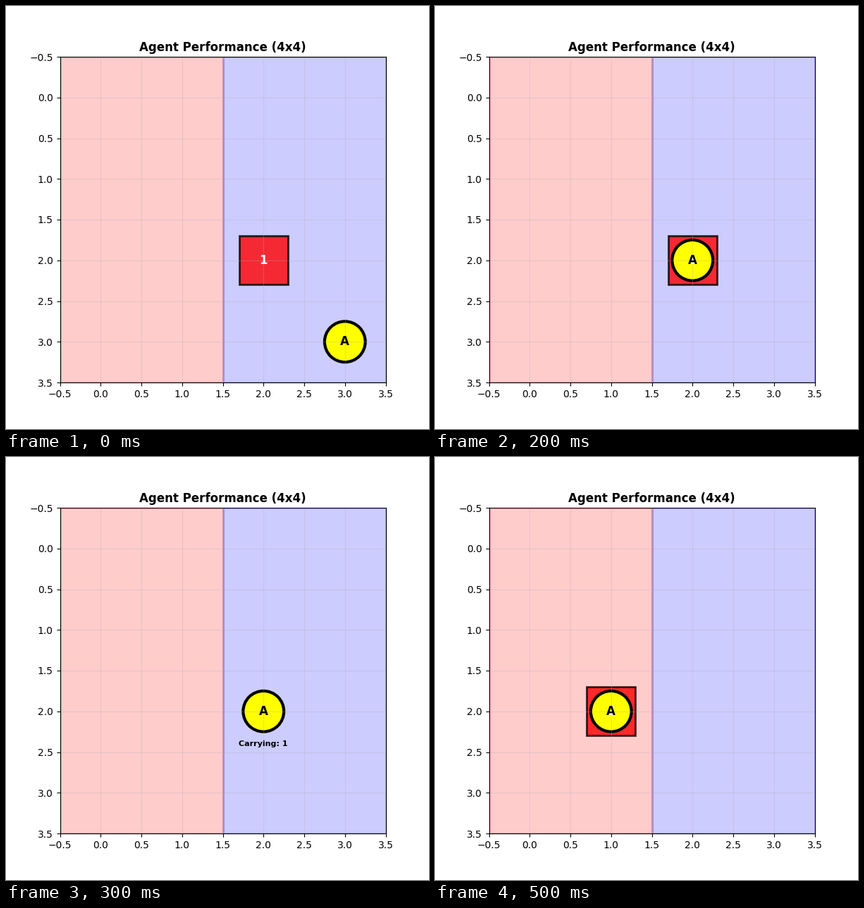
A matplotlib script for the animation above (0.6 s loop, 600 by 600 pixels).

```python
import matplotlib.pyplot as plt
from matplotlib.animation import FuncAnimation
from matplotlib.patches import Circle, Rectangle

GRID = 4
# (agent cell, box cell or None while the box is carried)
STEPS = [
    ((3, 3), (2, 2)),
    ((3, 2), (2, 2)),
    ((2, 2), (2, 2)),
    ((2, 2), None),
    ((1, 2), None),
    ((1, 2), (1, 2)),
]

plt.rcParams["font.family"] = "DejaVu Sans"
fig, ax = plt.subplots(figsize=(6, 6), dpi=100)


def label(x, y, text, color="black", size=12):
    ax.text(x, y, text, color=color, fontsize=size, weight="bold",
            ha="center", va="center")


def draw_zone(left, color):
    ax.add_patch(Rectangle((left, -0.5), GRID / 2, GRID, facecolor=color,
                           edgecolor=color, linewidth=2, alpha=0.2))


def draw_box(x, y):
    ax.add_patch(Rectangle((x - 0.3, y - 0.3), 0.6, 0.6, facecolor="red",
                           edgecolor="black", linewidth=2, alpha=0.8))
    label(x, y, "1", "white")


def draw_agent(x, y, carrying):
    ax.add_patch(Circle((x, y), 0.25, facecolor="yellow",
                        edgecolor="black", linewidth=3))
    label(x, y, "A")
    if carrying:
        label(x, y + 0.4, "Carrying: 1", size=8)


def draw(step):
    agent, box = STEPS[step]
    ax.clear()
    ax.set_xlim(-0.5, GRID - 0.5)
    ax.set_ylim(GRID - 0.5, -0.5)
    ax.set_aspect("equal")
    ax.grid(True, alpha=0.3)
    ax.set_title(f"Agent Performance ({GRID}x{GRID})", weight="bold")
    draw_zone(-0.5, "red")
    draw_zone(GRID / 2 - 0.5, "blue")
    if box:
        draw_box(*box)
    draw_agent(*agent, carrying=box is None)
    return []


anim = FuncAnimation(fig, draw, frames=len(STEPS), interval=100, repeat=True)
plt.show()
```
